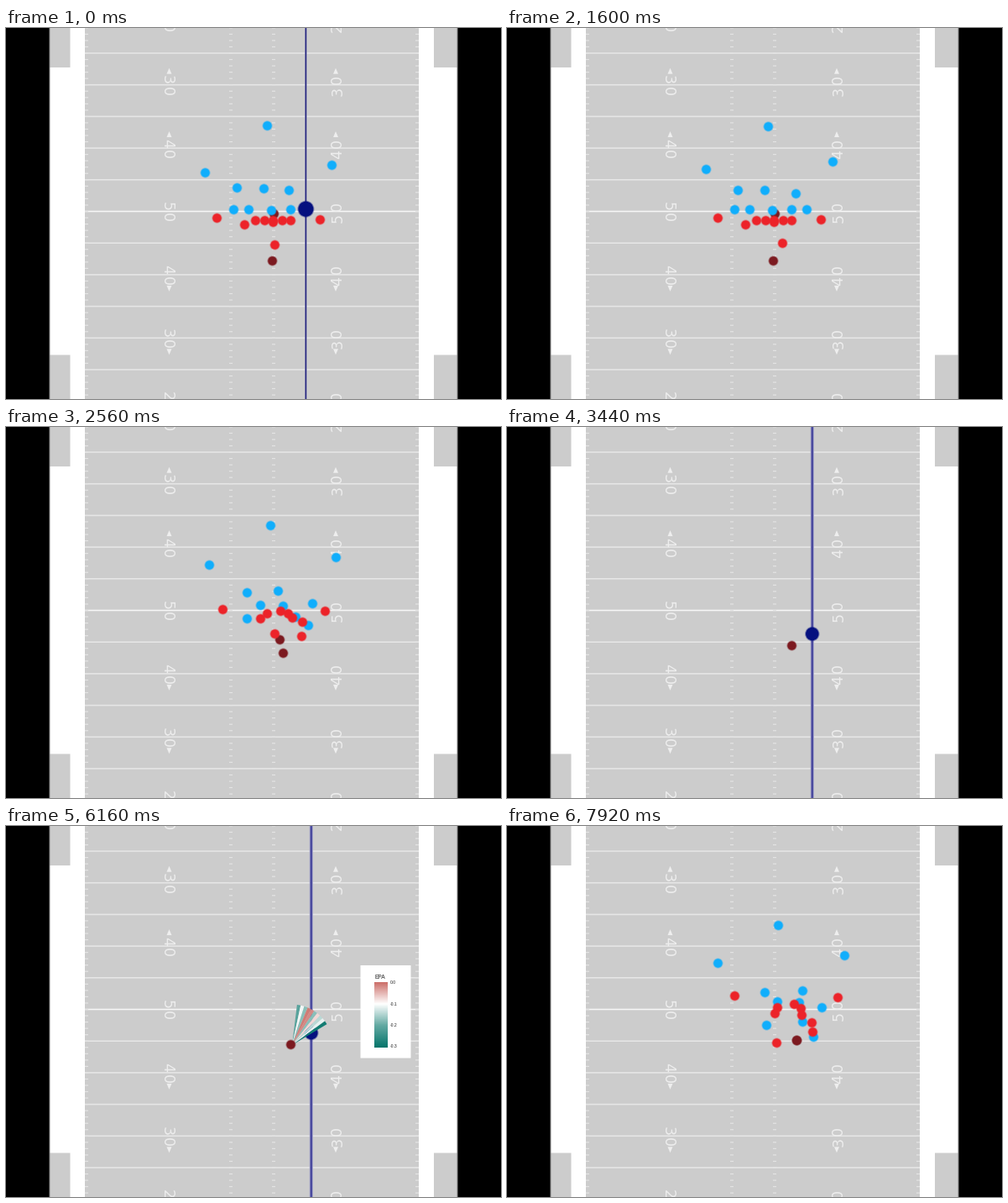
These frames come from a looping animation (590 px wide and 442 px high, 8000 ms). A matplotlib script:

```python
import numpy as np
import matplotlib.pyplot as plt
from matplotlib.animation import FuncAnimation
from matplotlib.colors import LinearSegmentedColormap, to_rgba
from matplotlib.patches import Circle, Polygon, Rectangle

plt.rcParams["path.snap"] = False

W, H, DPI = 590, 442, 100
FRAMES, STEP = 100, 80
PLAY, PAUSE, RESUME = 16, 36, 97          # when the play runs, stops, runs on
CLEAR, FAN_ON, FAN_OFF = 40, 55, 87
SNAP, LAST = 8, 22                        # play steps

GREY, SKY, RED = "#cccccc", "#10aefc", "#ec2329"
MAROON, NAVY = "#7c1a20", "#05107f"
EPA = LinearSegmentedColormap.from_list(
    "epa", [(0, "#cc706a"), (0.33, "white"), (0.66, "#64aaa3"), (1, "#05756b")])

fig = plt.figure(figsize=(W / DPI, H / DPI), dpi=DPI, facecolor="black")
ax = fig.add_axes([0, 0, 1, 1])
ax.axis("off")


def pt(px):
    return px * 72 / DPI


def box(x0, y0, x1, y1, color, z=0):
    return ax.add_patch(Rectangle((x0, y0), x1 - x0, y1 - y0, color=color, lw=0, zorder=z))


def draw_field():
    box(52, 0, 538, H, "white")
    box(94, 0, 492, H, GREY)
    for x0, x1 in ((52, 76.5), (510, 538)):
        box(x0, 0, x1, 47, GREY)
        box(x0, 389.5, x1, H, GREY)
    ax.vlines([52, 538], 0, H, color="#8a8a8a", lw=pt(1))

    mid, gap = 218.5, 37.7
    for k in range(-5, 6):
        ax.hlines(mid + k * gap, 94, 492, color="#e6e6e6" if k else "#f6f6f6",
                  lw=pt(1.6), zorder=1)
    ticks = mid + np.arange(-29, 30) * gap / 5
    for x in (94, 266, 317, 488):
        ax.hlines(ticks, x, x + 4, color="#e4e4e4", lw=pt(1.2), zorder=1)

    style = dict(color="#eeeeee", ha="center", va="center", zorder=2,
                 fontsize=pt(17.5), family="DejaVu Sans", clip_on=True)
    for k in range(-3, 4):
        y = mid + 2 * k * gap
        tens, s = str(5 - abs(k)), np.sign(k)
        for x, shift, rot, digits in ((194.5, -2.8, -90, tens + "0"), (393, 2.2, 90, "0" + tens)):
            for dy, d in zip((-6, 7.5), digits):
                ax.text(x + shift, y + dy, d, rotation=rot, **style)
            if k:
                tip = [(x - 3, y + 13 * s), (x + 3, y + 13 * s), (x, y + 20 * s)]
                ax.add_patch(Polygon(tip, color="#eeeeee", lw=0, zorder=2))


def draw_marker(x, y, radius, core, halo):
    """Soft vertical guide with a large dot on the picked player."""
    (core_color, core_width), (halo_color, halo_width) = core, halo
    return [
        ax.vlines(x, 0, H, color=halo_color, lw=pt(halo_width), zorder=3),
        ax.vlines(x, 0, H, color=core_color, lw=pt(core_width), zorder=3),
        ax.add_patch(Circle((x, y), radius, fc=NAVY, ec=to_rgba(NAVY, 0.4), lw=pt(2), zorder=8)),
    ]


def draw_fan(apex=(341, 261), radius=48.4, first=83, last=31):
    values = (0.7, 0.36, 0.58, 0.03, 0.06, 0.58, 0.24, 0.48, 0.38, 0.95)
    angles = np.radians(np.linspace(first, last, len(values) + 1))
    rim = np.array(apex) + radius * np.column_stack([np.cos(angles), -np.sin(angles)])
    return [ax.add_patch(Polygon([apex, a, b], color=EPA(v), lw=0, zorder=9))
            for v, a, b in zip(values, rim, rim[1:])]


def draw_legend():
    style = dict(color="#222222", va="center", family="Liberation Sans", zorder=12)
    parts = [
        box(422.5, 166, 482.5, 276.5, "white", 10),
        ax.imshow(np.linspace(0, 1, 128)[:, None], cmap=EPA, aspect="auto",
                  extent=(439, 455, 264, 186), zorder=11),
        ax.text(439, 180.5, "EPA", fontsize=pt(6.6), **style),
    ]
    for i, label in enumerate(("0.0", "-0.1", "-0.2", "-0.3")):
        parts.append(ax.text(458, 187 + 25.2 * i, label, fontsize=pt(5), **style))
    return parts


def dots(color, z):
    return ax.scatter([], [], s=pt(10.4) ** 2, facecolor=color,
                      edgecolor=[to_rgba(color, 0.4)], lw=pt(1.8), zorder=z)


class Unit:
    """Players sharing one timing: start + run * progress ** power."""

    def __init__(self, starts, runs, power, onset=SNAP):
        self.starts, self.runs = np.array(starts, float), np.array(runs, float)
        self.power, self.onset = np.array(power), onset

    def at(self, p):
        t = np.clip((p - self.onset) / (LAST - self.onset), 0, 1)
        return self.starts + self.runs * t ** self.power


blockers = [(297 + 10.5 * i, 229) for i in range(5)]
offence = [
    Unit(blockers, [(25, -13), (34, -17), (32, -12), (22, -4), (24, 5)], (1, 1)),
    Unit([(283.5, 233.5), (318, 231)], [(35.5, -10.5), (3, 26.5)], (1.1, 1)),
    Unit([(251, 226), (373.5, 228)], [(20, -24)], (2, 1.8)),
    Unit([(320, 258)], [(44, -13)], (1, 1), onset=0),
]
defence = [
    Unit([(270.5, 215.5), (288.5, 216), (315.5, 217), (339, 216), (357, 216)],
         [(38, 21), (33, -7.5), (32.5, -7), (13, 17), (8, 34.5)], (1.5, 1)),
    Unit([(237, 172), (388, 162.5)], [(13.5, -9)], (3, 0.5), onset=0),
    Unit([(310.5, 116), (275, 190), (306.5, 191)],
         [(12.5, 1.5), (32, 8), (45.5, 5)], (3, 0.5), onset=0),
    Unit([(337, 193)], [(38, 23)], (1, 1), onset=0),
]
passer = Unit([(317, 276.5)], [(27.5, -22)], (1.4, 2))


def team(units, p):
    return np.vstack([u.at(p) for u in units])


def ball_at(p):
    """Flies from the centre into the passer's hands."""
    t = np.clip((p - SNAP - 2) / 9, 0, 1)
    return (1 - t) * np.array([(318.5, 221)]) + t * passer.at(p)


def play_step(i):
    step = min(max(i - PLAY, 0), PAUSE - PLAY)
    return step + max(i - RESUME, 0)


draw_field()
ball_dot, sky_dots, red_dots, passer_dot = (
    dots(c, z) for c, z in ((MAROON, 4), (SKY, 5), (RED, 6), (MAROON, 10)))
crowd = [ball_dot, sky_dots, red_dots]
first_marker = draw_marker(357.4, 215.7, 9, ("#23237c", 1.3), ("#8585b5", 2.2))
second_marker = draw_marker(363.8, 246.5, 7.7, ("#42429a", 2), ("#9696c4", 4))
overlay = draw_fan() + draw_legend()
ax.set(xlim=(0, W), ylim=(H, 0))


def show(artists, on):
    for art in artists:
        art.set_visible(on)


def update(i):
    p = play_step(i)
    ball_dot.set_offsets(ball_at(p))
    sky_dots.set_offsets(team(defence, p))
    red_dots.set_offsets(team(offence, p))
    passer_dot.set_offsets(passer.at(p))
    show(crowd, not CLEAR <= i < RESUME)
    show(first_marker, i < PLAY)
    show(second_marker, PAUSE <= i < RESUME)
    show(overlay, FAN_ON <= i < FAN_OFF)
    return []


anim = FuncAnimation(fig, update, frames=FRAMES, interval=STEP,
                     repeat=True, repeat_delay=0, blit=False)
plt.show()
```
